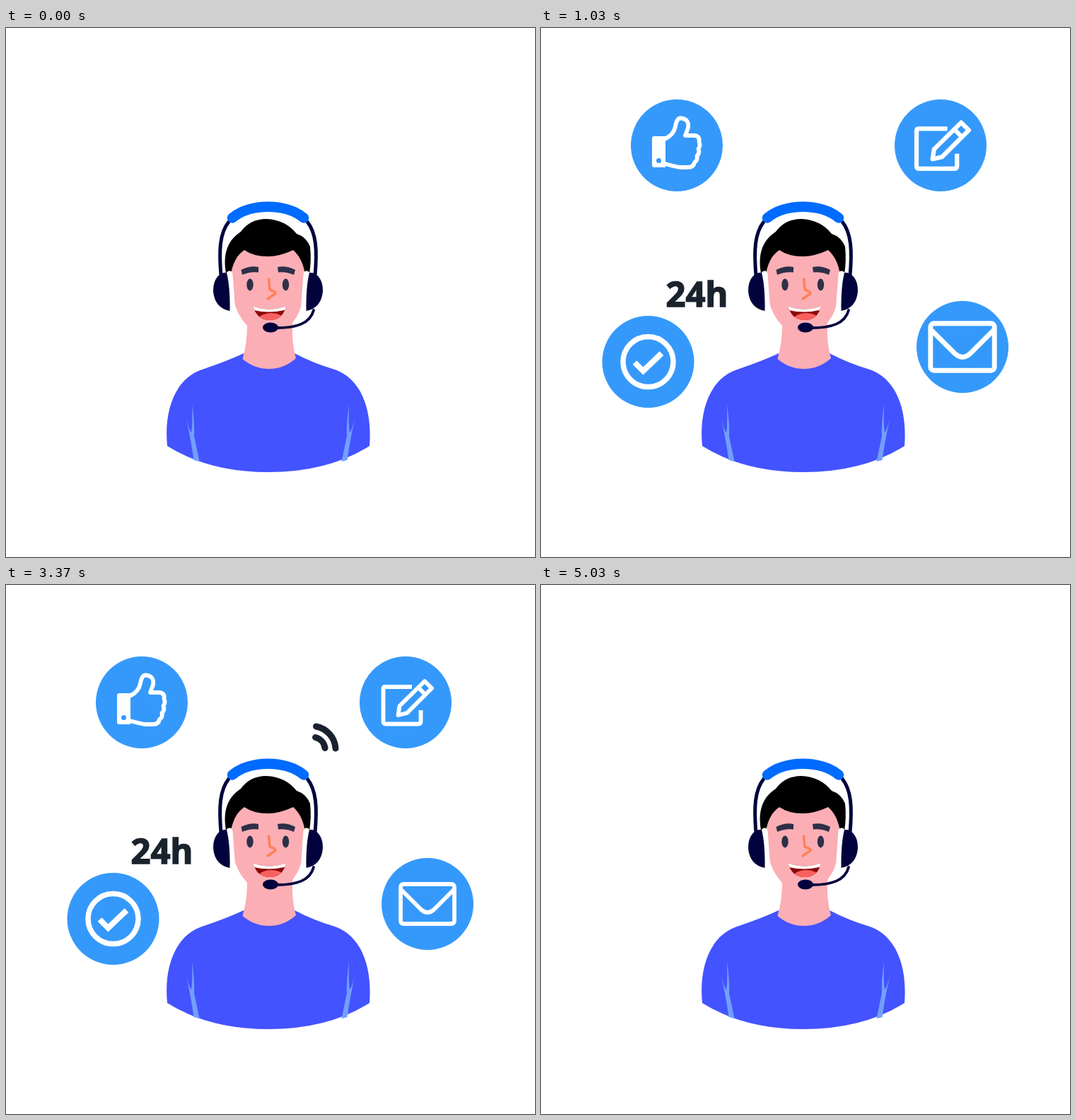
An HTML page that plays this animation: 748 by 748 pixels, repeating every 5.06 s.

```html
<!DOCTYPE html>
<html lang="en">
<head>
<meta charset="utf-8">
<title>Support agent</title>
<style>
  html, body { margin: 0; height: 100%; overflow: hidden; background: #fff; }
  svg { display: block; width: 100vw; height: 100vh; }
  .line { fill: none; stroke: #fff; stroke-width: 5.8; stroke-linejoin: round; }
  .navy { fill: #02033d; }
  .wire { fill: none; stroke: #02033d; stroke-linecap: round; }
  .dark { fill: #2d3047; }
  .wave { fill: none; stroke: #1a232d; stroke-width: 9; stroke-linecap: round; }
  #hours { font: 700 49px "Open Sans", sans-serif; text-anchor: middle; fill: #1a232d; stroke: #1a232d; stroke-width: 1.4; }
</style>
</head>
<body>
<svg viewBox="0 0 748 748">
  <defs>
    <clipPath id="mouth"><path d="M349 393Q372 402 396 393C393 405 387 413 373 413C359 413 353 405 349 393Z"/></clipPath>
    <g id="side">
      <path class="wire" stroke-width="5" d="M315 274C302 290 301 315 304 350"/>
      <path d="M316 348L319.500 396.500" stroke="#fff" stroke-width="9" stroke-linecap="round"/>
      <path class="navy" d="M308 346Q293 351 293 372Q295 396 316.500 400Q317 366 312 346Z"/>
    </g>
    <path id="shine" fill="#739ffb" d="M263 532Q267 560 266 577L273.500 613L265.500 611Q261 578 254 550Q259 569 262 572Q264 560 263 532Z"/>
  </defs>

  <!-- agent -->
  <path fill="#4353ff" d="M336 460Q315 470 280 482C239 494 223 541 228 591Q287 628 371 628Q455 628 514 591C518 541 503 494 462 482Q435 474 408 460Z"/>
  <use href="#shine"/>
  <use href="#shine" transform="translate(748) scale(-1 1)"/>
  <path fill="#fcaeb5" d="M337 312C324 320 318 335 319 348L321 380Q325 404 341 421Q341 445 334.500 468Q351 482 372 482Q393 482 410 467Q404 448 405 417Q417 403 420 380L424 348Q419 322 406 312Z"/>
  <path d="M311 347C307 322 311 302 332 288Q345 270 368 270Q395 271 411 291Q424 295 430 309Q432 329 429 347L423 348C420 332 415 322 406 314Q387 323 370 323Q350 323 337 314C325 322 321 334 318 347Z"/>
  <use href="#side"/>
  <use href="#side" transform="translate(741) scale(-1 1)"/>
  <path fill="none" stroke="#006bff" stroke-width="14.500" stroke-linecap="round" d="M320 268.500C345 247.500 396 247.500 421 268.500"/>
  <path class="wire" stroke-width="3.800" d="M435 399C430 418 411 424 382 424"/>
  <ellipse class="navy" cx="374" cy="423.500" rx="11" ry="7"/>
  <path class="dark" d="M332.500 342Q345 335.500 357 338V345.500Q345 344 334 349ZM384 338Q397 335.500 409 342L407 349Q396 344 385 345.500Z"/>
  <g id="eyes" class="dark">
    <ellipse cx="345" cy="0" rx="4.700" ry="8.500"/>
    <ellipse cx="395.500" cy="0" rx="4.700" ry="8.500"/>
  </g>
  <path fill="none" stroke="#ff8158" stroke-width="3.500" stroke-linecap="round" stroke-linejoin="round" d="M371.500 355L373 370Q382 373 381 375.500L370 383"/>
  <g clip-path="url(#mouth)">
    <path fill="#8c0708" d="M340 385h65v35h-65z"/>
    <ellipse cx="375" cy="412" rx="18" ry="9" fill="#f8605f"/>
    <path fill="#fff" d="M340 385H405V396Q372 407 340 396Z"/>
  </g>

  <!-- badges -->
  <g class="badge" data-x="151.500" data-y="472">
    <g class="icon">
      <circle class="line" r="35.500" style="stroke-width:7.500"/>
      <path class="line" d="M-19 1L-7 13L19 -12" style="stroke-width:8;stroke-linejoin:miter"/>
    </g>
  </g>
  <g class="badge" data-x="192" data-y="166">
    <g class="icon">
      <path fill="#fff" d="M-32 -13H-16V31H-32Q-35 31 -35 28V-10Q-35 -13 -32 -13Z"/>
      <circle cx="-25.500" cy="21.500" r="3.500" fill="#3599fb"/>
      <path class="line" d="M-17 -9Q-4 -15 -2 -27Q0 -39 6 -38.500Q18 -37 16 -25L12 -14H25Q33 -13 31.500 -5Q34 0 30.500 5Q33 11 28.500 15Q30 21 25 24Q24 31 15 31H4Q-6 29 -17 26"/>
    </g>
  </g>
  <g class="badge" data-x="565" data-y="166">
    <g class="icon">
      <path class="line" d="M9 -22H-29Q-31.500 -22 -31.500 -19V27Q-31.500 30.500 -28 30.500H18Q21.500 30.500 21.500 27V11"/>
      <path class="line" d="M27 -30L37 -20L2 15L-10.500 18L-8.500 5ZM18 -21L28 -11"/>
    </g>
  </g>
  <g class="badge" data-x="596" data-y="451">
    <g class="icon">
      <rect class="line" x="-38" y="-28" width="76" height="56" rx="4"/>
      <path class="line" d="M-37 -20L-9 8Q0 16 9 8L37 -20"/>
    </g>
  </g>

  <path class="wave" d="M437.500 215.500A18 18 0 0 1 451 230.500"/>
  <path class="wave" d="M438.500 200A34 34 0 0 1 466 231"/>
  <path class="wave" d="M440 184.500A50 50 0 0 1 481.500 232"/>
  <text id="hours" y="-1">24h</text>
</svg>
<script>
  const LOOP = 5060;
  const all = selector => [...document.querySelectorAll(selector)];
  const eyes = document.getElementById('eyes');
  const hours = document.getElementById('hours');

  // Eased value of a [time, value, time, value, ...] track; times are in 1/30 s steps.
  function track(step, keys) {
    if (step <= keys[0]) return keys[1];
    for (let i = 2; i < keys.length; i += 2) {
      if (step < keys[i]) {
        const u = (step - keys[i - 2]) / (keys[i] - keys[i - 2]);
        return keys[i - 1] + (keys[i + 1] - keys[i - 1]) * u * u * (3 - 2 * u);
      }
    }
    return keys[keys.length - 1];
  }

  const enter = [4, 8, 12, 15], leave = [124, 128, 132, 135];
  const badges = all('.badge').map((group, i) => {
    const a = enter[i], b = leave[i];
    const disc = document.createElementNS('http://www.w3.org/2000/svg', 'circle');
    disc.setAttribute('r', 65);
    disc.setAttribute('fill', '#3599fb');
    group.prepend(disc);
    group.setAttribute('transform', `translate(${group.dataset.x} ${group.dataset.y})`);
    return {
      disc,
      icon: group.querySelector('.icon'),
      discKeys: [a, 0, a + 8, 1, b, 1, b + 7, 0],
      iconKeys: [a + 8, 0, a + 15, 1.2, a + 22, 1, b - 15, 1, b - 8, 1.2, b, 0],
    };
  });

  const waves = all('.wave');
  const waveKeys = [
    [33, 0, 36, 1, 120, 1, 124, 0],
    [37, 0, 40, 1, 108, 1, 112, 0],
    [41, 0, 44, 1, 91, 1, 95, 0],
  ];
  const blinkKeys = [18, 68.4, 117.7].flatMap(c => [c - 3, 1, c, 0.1, c + 3, 1]);
  const riseKeys = [14, 0, 22, 1, 143, 1, 151, 0];
  const swingKeys = [39.8, 0, 46.7, 20, 53.6, -20, 60.5, 20, 67.4, -20, 74, 0];

  const scale = (element, s) => element.setAttribute('transform', `scale(${s})`);

  function draw(now) {
    const step = Math.floor((now % LOOP) * 0.03 + 0.15);
    for (const b of badges) {
      scale(b.disc, track(step, b.discKeys));
      scale(b.icon, track(step, b.iconKeys));
    }
    waves.forEach((wave, i) => wave.setAttribute('opacity', track(step, waveKeys[i])));
    eyes.setAttribute('transform', `translate(0 363) scale(1 ${track(step, blinkKeys)})`);
    hours.setAttribute('transform',
      `translate(220.5 395) rotate(${track(step, swingKeys)}) scale(1 ${track(step, riseKeys)})`);
  }

  const start = performance.now();
  function loop() {
    draw(performance.now() - start);
    requestAnimationFrame(loop);
  }
  loop();
</script>
</body>
</html>
```
